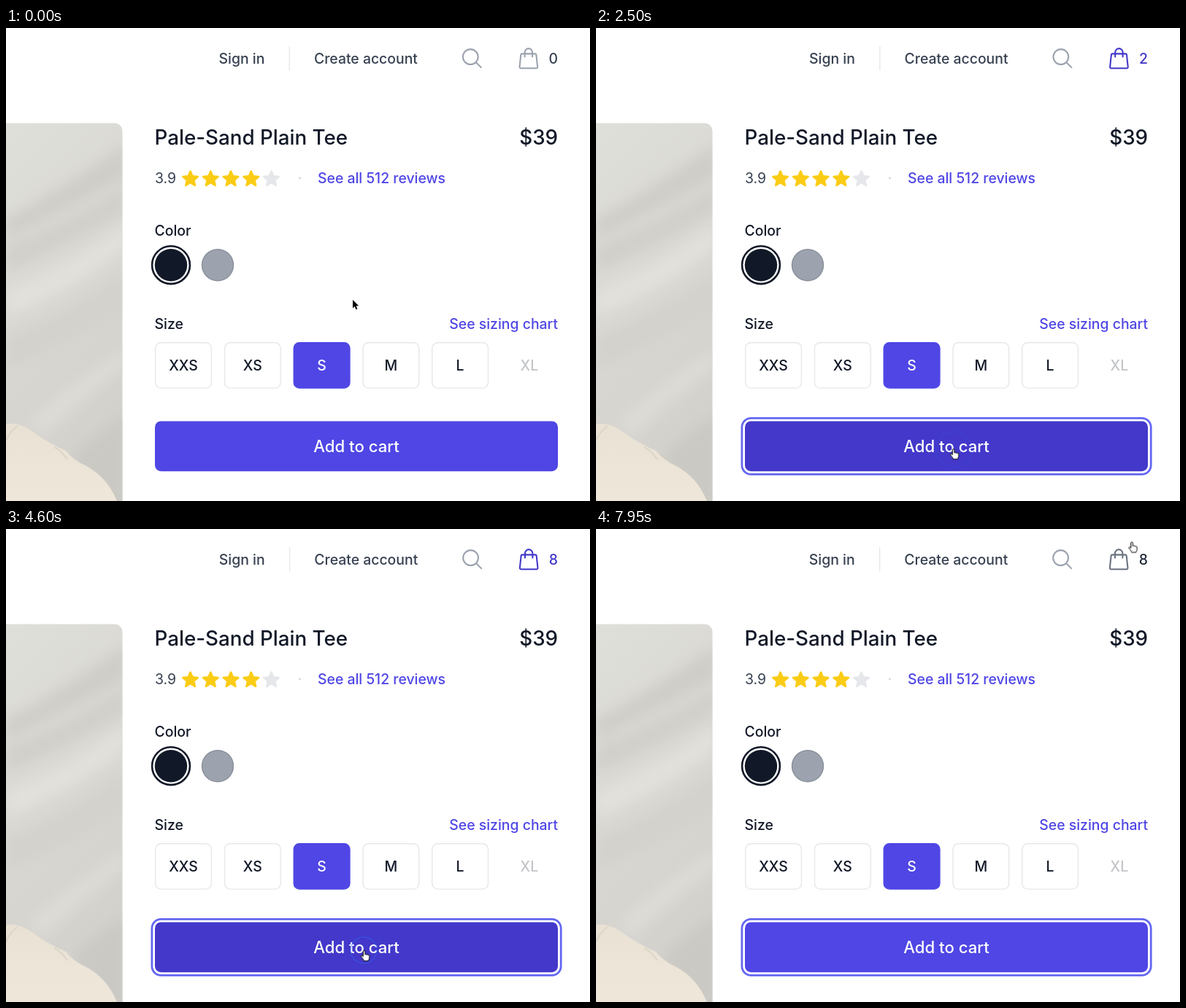
Recreate the animation shown at these times as an HTML page. Size 800 by 649 pixels, loop 8 s.

```html
<!DOCTYPE html>
<html lang="en">
<head>
<meta charset="utf-8">
<title>Product page</title>
<style>
  html, body { margin: 0; width: 100%; height: 100%; overflow: hidden; background: #fff; }
  svg { display: block; width: 800px; height: 649px; }
  text { font: 500 19.4px Inter, sans-serif; font-optical-sizing: none; fill: #111827; }
  .muted { fill: #374151; }
  .link { fill: #4f46e5; }
  .title { font-size: 27.74px; }
  .end { text-anchor: end; }
  .mid { text-anchor: middle; }
  .icon { fill: none; stroke: #9ca3af; stroke-width: 1.5; stroke-linecap: round; stroke-linejoin: round; }

  #bag, #count, #button, #ring, #cursor, #arrow, #hand { animation: 8s linear infinite; }
  #bag { animation-name: bag; }
  #count { animation-name: count; }
  #button { animation-name: hover; }
  #ring { animation-name: focus; animation-timing-function: step-end; }
  #cursor { animation-name: move; animation-timing-function: ease-in-out; }
  #arrow { animation-name: arrow; animation-timing-function: step-end; }
  #hand { animation-name: hand; animation-timing-function: step-end; }
  .ripple { fill: none; stroke: #2f68f5; stroke-width: 1.5; opacity: 0; animation: ripple 8s infinite; }

  @keyframes move {
    0%, 6.25% { transform: translate(475px, 373px); }
    13.1% { transform: translate(488.5px, 571px); }
    16.25%, 45% { transform: translate(489.5px, 577.5px); }
    57%, 90.6% { transform: translate(490.5px, 578.5px); }
    99.2%, 100% { transform: translate(734px, 18px); }
  }
  @keyframes arrow {
    0% { opacity: 1; }
    11.1% { opacity: 0; }
    92.4% { opacity: 1; }
    97% { opacity: 0; }
  }
  @keyframes hand {
    0% { opacity: 0; }
    11.1% { opacity: 1; }
    92.4% { opacity: 0; }
    97% { opacity: 1; }
  }
  @keyframes hover {
    0%, 11.1% { fill: #4f46e5; }
    13%, 92.4% { fill: #4338ca; }
    94.3%, 100% { fill: #4f46e5; }
  }
  @keyframes focus {
    0% { opacity: 0; }
    18.1% { opacity: 1; }
  }
  @keyframes bag {
    0%, 19.3% { stroke: #9ca3af; }
    20.6%, 81.2% { stroke: #4338ca; }
    83.7%, 97% { stroke: #9ca3af; }
    98.8%, 100% { stroke: #6b7280; }
  }
  @keyframes count {
    0%, 19.3% { fill: #374151; }
    20.6%, 81.2% { fill: #4338ca; }
    83.7%, 97% { fill: #374151; }
    98.8%, 100% { fill: #1f2937; }
  }
  @keyframes ripple {
    0% { r: 6px; opacity: 1; animation-timing-function: ease-out; }
    5%, 100% { r: 28px; opacity: 0; }
  }
</style>
</head>
<body>
<svg viewBox="0 0 800 649">
  <defs>
    <clipPath id="frame"><rect x="-20" y="130.5" width="179.5" height="540" rx="11"/></clipPath>
    <filter id="soft" x="-30%" y="-30%" width="160%" height="160%"><feGaussianBlur stdDeviation="9"/></filter>
    <linearGradient id="wall" x1="0" y1="0" x2=".3" y2="1">
      <stop offset="0" stop-color="#dfdfda"/>
      <stop offset=".5" stop-color="#d9d8d3"/>
      <stop offset="1" stop-color="#d3d1cc"/>
    </linearGradient>
    <linearGradient id="cloth" x1="0" y1="0" x2="0" y2="1">
      <stop offset="0" stop-color="#e8e1d4"/>
      <stop offset="1" stop-color="#eee7da"/>
    </linearGradient>
    <path id="star" d="M10.868 2.884c-.321-.772-1.415-.772-1.736 0l-1.83 4.401-4.753.381c-.833.067-1.171 1.107-.536 1.651l3.62 3.102-1.106 4.637c-.194.813.691 1.456 1.405 1.02L10 15.591l4.069 2.485c.713.436 1.598-.207 1.404-1.02l-1.106-4.637 3.62-3.102c.635-.544.297-1.584-.536-1.65l-4.752-.382z"/>
  </defs>

  <g clip-path="url(#frame)">
    <rect y="130" width="160" height="519" fill="url(#wall)"/>
    <g filter="url(#soft)">
      <path d="M0 262Q70 225 165 158V205Q70 255 0 290Z" fill="#cfcdc7"/>
      <path d="M0 300Q80 270 165 218V250Q80 300 0 335Z" fill="#d1cfc9"/>
      <path d="M0 362Q90 325 165 268V300Q90 360 0 395Z" fill="#e2e1dc"/>
      <path d="M0 425Q90 390 165 335V385Q90 430 0 470Z" fill="#d4d2cd"/>
      <path d="M30 540Q100 480 165 440V462Q100 510 50 560Z" fill="#dddcd7"/>
      <path d="M90 590Q130 550 165 530V660H140Z" fill="#cbc9c3"/>
    </g>
    <path d="M0 543Q18 541 34 552Q58 570 82 580Q91 592 108 600Q138 615 152 649H0Z" fill="url(#cloth)"/>
    <path d="M0 566Q6 553 16 546M66 575Q76 580 84 592" fill="none" stroke="#ddd5c6" stroke-width="2"/>
  </g>

  <g id="nav">
    <text class="muted" x="291.5" y="48.5">Sign in</text>
    <path d="M388.3 25V58.3" stroke="#e5e7eb" stroke-width="1.4"/>
    <text class="muted" x="422" y="48.5">Create account</text>
    <path class="icon" transform="translate(621.7 25) scale(1.387)" d="M21 21l-5.197-5.197a7.5 7.5 0 1 0-10.607-10.607a7.5 7.5 0 0 0 10.607 10.607z"/>
    <g id="bag" class="icon" transform="translate(699.2 25)">
      <path transform="scale(1.387)" d="M15.75 10.5V6a3.75 3.75 0 1 0-7.5 0v4.5m11.356-1.993l1.263 12c.07.665-.45 1.243-1.119 1.243H4.25a1.125 1.125 0 0 1-1.12-1.243l1.264-12A1.125 1.125 0 0 1 5.513 7.5h12.974c.576 0 1.059.435 1.119 1.007z"/>
    </g>
  </g>
  <text id="count" class="end" x="756" y="48.5">0</text>

  <text class="title" x="203.5" y="160">Pale-Sand Plain Tee</text>
  <text class="title end" x="756" y="160">$39</text>
  <text class="muted" x="204" y="212.6" style="font-weight:400">3.9</text>
  <g id="stars"></g>
  <circle cx="402.5" cy="206" r="1.4" fill="#d1d5db"/>
  <text class="link" x="427" y="212.6">See all 512 reviews</text>

  <text x="203.5" y="285">Color</text>
  <circle cx="226" cy="325.2" r="22.2" fill="#111827"/>
  <circle cx="226" cy="325.2" r="25.9" fill="none" stroke="#111827" stroke-width="2.6"/>
  <circle cx="290" cy="325.2" r="22.2" fill="#9ca3af"/>
  <circle cx="290" cy="325.2" r="21.5" fill="none" stroke="#000" stroke-opacity=".12" stroke-width="1.4"/>

  <text x="203.5" y="412.8">Size</text>
  <text class="link end" x="756" y="412.8">See sizing chart</text>
  <g id="sizes"></g>

  <rect id="ring" x="199.9" y="535.3" width="560.3" height="77" rx="12.4" fill="none" stroke="#6366f1" stroke-width="2.77"/>
  <rect id="button" x="204" y="539.4" width="552" height="68.8" rx="8.3"/>
  <text class="mid" x="480" y="581.6" style="font-size:22.2px;fill:#fff">Add to cart</text>
  <g id="ripples"></g>

  <g id="cursor" stroke-linejoin="round">
    <path id="arrow" d="M0 0V11.4L2.6 9L4.5 13.2L6.4 12.4L4.6 8.3H8.2Z" fill="#000" stroke="#fff" stroke-width="1" paint-order="stroke"/>
    <path id="hand" transform="translate(-4.8 -.7)" d="M3.5 8.8V2a1.3 1.3 0 0 1 2.6 0v4.2a1.1 1.1 0 0 1 2.1 .3a1.1 1.1 0 0 1 2 .5a1 1 0 0 1 1.8 .6v3c0 2-1.2 2.6-1.4 4.2H4.6C4.3 12.8 2.2 11 .8 8.9C.2 7.8 1.6 7 2.4 7.8Z" fill="#fff" stroke="#000" stroke-width="1"/>
  </g>
</svg>
<script>
  const $ = id => document.getElementById(id);
  const clicks = [1450, 2240, 3050, 3700, 3880, 4080, 4280, 4450];
  const RELEASE = 100;

  $('stars').innerHTML = [0, 1, 2, 3, 4].map(i =>
    `<use href="#star" fill="${i < 4 ? '#facc15' : '#e5e7eb'}"
      transform="translate(${238.7 + i * 27.74} 192) scale(1.387)"/>`).join('');

  $('sizes').innerHTML = ['XXS', 'XS', 'S', 'M', 'L', 'XL'].map((label, i) => {
    const x = 204 + i * 94.77, picked = label === 'S', soldOut = label === 'XL';
    const box = soldOut ? '' : `<rect x="${x + .7}" y="431.7" width="76.7" height="62.4" rx="7.6" stroke-width="1.4"
      fill="${picked ? '#4f46e5' : '#fff'}" stroke="${picked ? '#4f46e5' : '#e5e7eb'}"/>`;
    return `${box}<text class="mid" x="${x + 39}" y="469.7"
      style="fill:${picked ? '#fff' : '#111827'};opacity:${soldOut ? .25 : 1}">${label}</text>`;
  }).join('');

  $('ripples').innerHTML = clicks.map(ms =>
    `<circle class="ripple" cx="490" cy="578" r="6" style="animation-delay:${ms}ms"/>`).join('');

  const count = $('count');
  const zeroWidth = count.getComputedTextLength();
  const clock = $('cursor').getAnimations()[0];

  // The header is right-aligned, so it follows the width of the digit.
  function draw() {
    const time = (clock.currentTime || 0) % 8000;
    const total = String(clicks.filter(ms => time >= ms + RELEASE).length);
    if (count.textContent !== total) {
      count.textContent = total;
      $('nav').setAttribute('transform', `translate(${zeroWidth - count.getComputedTextLength()} 0)`);
    }
    requestAnimationFrame(draw);
  }
  draw();
</script>
</body>
</html>
```
